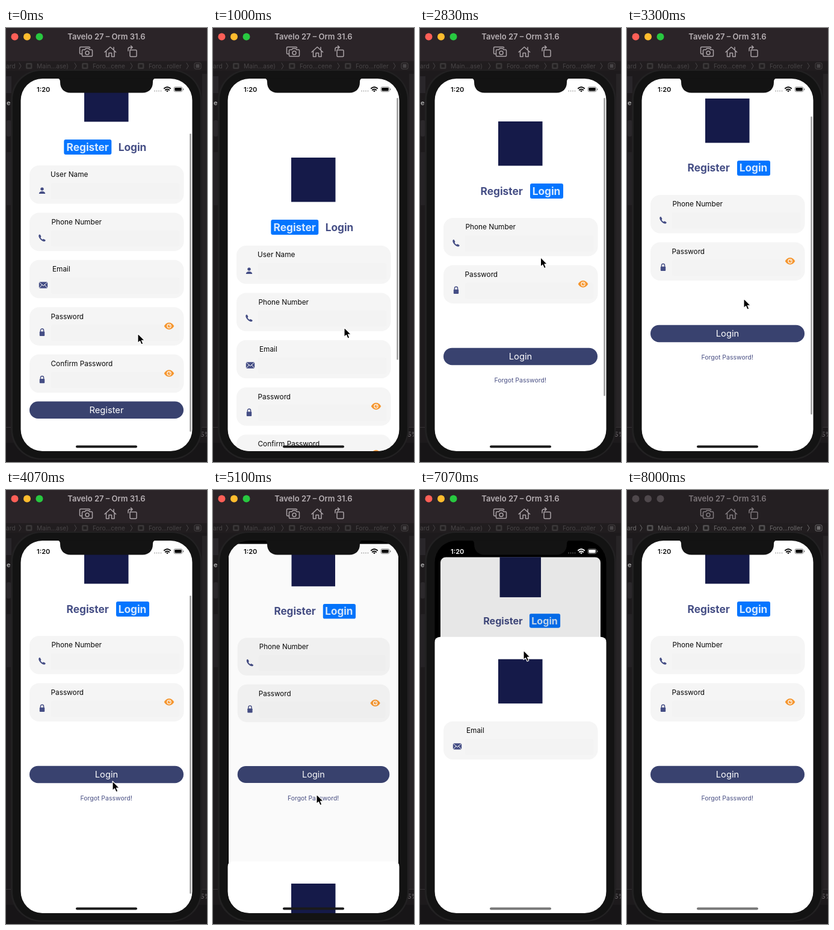
These frames come from a looping animation (334 by 720 pixels, 9.5 s). An HTML page:

```html
<!DOCTYPE html>
<html lang="en">
<head>
<meta charset="utf-8">
<title>Sign-in screens</title>
<style>
  html, body { margin: 0; width: 334px; height: 720px; overflow: hidden; background: #1c191b; }
  svg { display: block; font-family: Inter, "Open Sans", sans-serif; }
  .tab { font-size: 17.3px; font-weight: 700; }
  .label { font-size: 11.8px; fill: #080808; }
  .action { font-size: 14.7px; fill: #fff; text-anchor: middle; }
  .line { fill: none; stroke-linecap: round; stroke-linejoin: round; }
</style>
</head>
<body>
<svg id="stage" width="334" height="720" viewBox="0 0 334 720"></svg>
<script>
const LOOP = 9500, NAVY = '#39426f', INK = '#454e85', BLUE = '#0475ff';

const rect = (x, y, w, h, r, fill, extra = '') =>
  `<rect x="${x}" y="${y}" width="${w}" height="${h}" rx="${r}" fill="${fill}" ${extra}/>`;
const text = (x, y, s, extra = '') => `<text x="${x}" y="${y}" ${extra}>${s}</text>`;

// Icons are drawn around their own centre.
const icons = {
  person: `<circle cy="-2.6" r="2.7"/><path d="M-5.2 5.3C-5.2-.2 5.2-.2 5.2 5.3Z"/>`,
  phone: `<path d="M-5.5-4.6C-4.7-5.8-3.6-6-3.1-5L-1.7-2.5C-1.3-1.7-2.6-1-2.4-.4C-1.8 1-.8 2 .6 2.6C1.2 2.8 1.7 1.4 2.6 1.9L5.2 3.4C6.2 4 5.5 5.4 4.3 5.9C.3 7.2-7.2-.5-5.5-4.6Z"/>`,
  mail: `<rect x="-7.2" y="-5.2" width="14.4" height="10.4" rx="1.8"/>
    <path class="line" stroke="#f5f5f5" d="M-6.5-4.5L0 1.3L6.5-4.5M-6.5 4.5L-2-.5M6.5 4.5L2-.5"/>`,
  lock: `<rect x="-4.2" y="-1.3" width="8.4" height="7.3" rx="1"/>
    <path class="line" stroke="${INK}" stroke-width="1.4" d="M-2.6-1V-3.3C-2.6-6.7 2.6-6.7 2.6-3.3V-1"/>`
};
const eye = y => `<g transform="translate(271 ${y})" fill="#f5962f">
  <path d="M-8.3 0C-4.2-7.6 4.2-7.6 8.3 0C4.2 7.6-4.2 7.6-8.3 0Z"/>
  <circle r="3.7" fill="#fff"/><circle r="2.5"/><circle cx=".6" cy="-.6" r=".9" fill="#fff"/></g>`;

const field = (y, name, icon, labelX, iconX = 60) =>
  rect(39, y, 256.5, 63.5, 16, '#f5f5f5') +
  rect(75, y + 29, 213, 27, 3, '#f3f3f3') +
  text(labelX, y + 19.3, name, 'class="label"') +
  `<g transform="translate(${iconX} ${y + 41.7})" fill="${INK}">${icons[icon]}</g>` +
  (icon === 'lock' ? eye(y + 31.3) : '');
const button = (y, name) =>
  rect(39, y, 256, 28.5, 14.2, NAVY) + text(167, y + 19.6, name, 'class="action"');
const logo = y => rect(130, y, 73.5, 73.5, 0, '#151a49');

const registerForm = [
  ['User Name', 'person', 74], ['Phone Number', 'phone', 75.5], ['Email', 'mail', 77, 62],
  ['Password', 'lock', 74.5], ['Confirm Password', 'lock', 74.5]
].map((f, i) => field(301 + i * 78.4, ...f)).join('') + button(692.5, 'Register');

const loginForm = field(315, 'Phone Number', 'phone', 75.5) + field(393.4, 'Password', 'lock', 74.5) +
  button(530.7, 'Login') +
  text(166.7, 588.3, 'Forgot Password!', `id="forgot" font-size="10.5" fill="#4a5084" text-anchor="middle"`);

const crumb = (x, name) => rect(x, 58, 10.5, 10, 2, '#777') + rect(x + 2.5, 60.5, 5.5, 5, 1, '#222') +
  text(x + 18, 67, name) + `<path class="line" stroke="#aaa" d="M${x + 81} 58l3 5l-3 5"/>`;

const desktop = `
  ${rect(0, 0, 334, 720, 0, '#1d1a1c')}
  ${rect(0, 55, 334, 16, 0, '#211d1f')}
  <g id="crumbs" font-size="10.2" fill="#aaa">${text(0, 67, 'ard')}
    <path class="line" stroke="#aaa" d="M22 58l3 5l-3 5"/>
    ${crumb(33, 'Main...ase)')}${crumb(126, 'Foro...cene')}${crumb(219, 'Foro...roller')}
    ${rect(313, 58, 11, 10, 2, 'none', 'stroke="#aaa"')}${rect(315.5, 60, 6, 6, 0, '#aaa')}</g>
  ${rect(0, 80, 9, 28, 0, '#29262a')}${rect(1, 153, 7, 27, 2, '#2b282b')}
  ${rect(1, 206, 7, 88, 0, '#252225')}${rect(326, 76, 8, 586, 0, '#272426')}
  ${rect(0, 662, 334, 1, 0, '#363235')}${rect(0, 688, 334, 32, 0, '#171517')}
  ${text(1, 128, 'e', 'font-size="11" font-weight="600" fill="#aaa"')}
  ${text(323, 678, '5%', 'font-size="11" fill="#6d696c"')}
  ${rect(0, 0, 334, 55, 0, '#2b2428', 'id="titleBar"')}
  ${[14.5, 35, 55.5].map(x => `<circle class="light" cx="${x}" cy="14.5" r="6"/>`).join('')}
  ${text(167, 18.5, 'Tavelo 27 – Orm 31.6', 'id="title" font-size="13" font-weight="600" text-anchor="middle"')}
  <g id="tools" class="line" stroke-width="1.5">
    <path d="M126 43h-2a1.5 1.5 0 0 1-1.5-1.5v-8.5a1.5 1.5 0 0 1 1.5-1.5h14a1.5 1.5 0 0 1 1.5 1.5"/>
    <path d="M128 36h3l1.5-2h5l1.5 2h3a1.5 1.5 0 0 1 1.5 1.5v8a1.5 1.5 0 0 1-1.5 1.5h-14a1.5 1.5 0 0 1-1.5-1.5v-8a1.5 1.5 0 0 1 1.5-1.5Z"/>
    <circle cx="135" cy="41.3" r="3"/>
    <path d="M164 40l9.3-8.5l9.3 8.5M166.5 38v9.5h4.5v-6h4.5v6h4.5v-9.5M179 36v-4"/>
    <path d="M206 36.5h9.5a1.5 1.5 0 0 1 1.5 1.5v8a1.5 1.5 0 0 1-1.5 1.5h-8a1.5 1.5 0 0 1-1.5-1.5ZM203 38v-3a3 3 0 0 1 3-3h4M207.5 29.5l2.7 2.5l-2.7 2.5"/>
  </g>`;

const phoneView = `
  ${rect(8, 69, 317.5, 647, 50, '#222122')}${rect(11, 71, 312, 643, 48, '#131313')}
  <clipPath id="screen">${rect(24.5, 84, 285, 618, 36, '#000')}</clipPath>
  <clipPath id="page">${rect(24, 84, 286, 619, 10, '#000')}</clipPath>
  <g clip-path="url(#screen)">
    ${rect(24, 84, 286, 619, 0, '#000')}
    <g id="main"><g clip-path="url(#page)">
      ${rect(24, 84, 286, 619, 0, '#fff')}
      <g id="scroll">${logo(155)}
        ${rect(96.3, 258, 79, 25, 3, BLUE, 'id="registerTab"')}
        ${rect(183, 258, 55, 25, 3, BLUE, 'id="loginTab"')}
        ${text(135.7, 276.5, 'Register', 'id="registerText" class="tab" text-anchor="middle"')}
        ${text(210, 276.5, 'Login', 'id="loginText" class="tab" text-anchor="middle"')}
        <g id="registerForm">${registerForm}</g><g id="loginForm">${loginForm}</g>
      </g>
      ${rect(305.4, 116, 2.1, 494.5, 1, '#8c8c8c', 'id="bar"')}
      ${rect(24, 84, 286, 619, 0, '#000', 'id="shade"')}
    </g></g>
    <g id="sheet">
      ${rect(24, 125, 286, 600, 9, '#fff')}${logo(162)}
      ${field(265, 'Email', 'mail', 77, 62)}
      ${rect(106, 614.5, 122, 33.5, 7, NAVY)}
      ${text(166.5, 636.5, 'Reset Password', 'class="action" style="font-size:13.9px"')}
    </g>
    ${rect(116, 692.5, 102, 4, 2, '#111', 'id="home"')}
  </g>
  <path fill="#131313" d="M84 83.5C89 83.5 90 86 90 90C90 101 97 107.5 107 107.5H227C237 107.5 244 101 244 90C244 86 245 83.5 250 83.5Z"/>
  <g id="status">
    ${text(51, 106, '1:20', 'font-size="11" font-weight="600"')}
    ${[247, 250.5, 254, 257.5].map(x => `<circle cx="${x}" cy="104.5" r=".9" opacity=".35"/>`).join('')}
    <path class="line" stroke="currentColor" stroke-width="1.9" stroke-linecap="butt" d="M262.8 100.2q5.2-4.6 10.4 0M264.8 102.8q3.2-2.8 6.4 0"/>
    <path d="M266 104.3q2-1.5 4 0l-2 2Z"/>
    ${rect(279, 97.7, 14, 8, 2.4, 'none', 'stroke="currentColor" stroke-opacity=".45"')}
    ${rect(280.3, 99, 11.4, 5.4, 1.3, 'currentColor')}
    ${rect(294, 100.2, 1.4, 3, .7, 'currentColor', 'opacity=".5"')}
  </g>`;

const pointer = `<path id="cursor" fill="#000" stroke="#fff" stroke-width="1.1" stroke-linejoin="round"
  d="M0 0V15.4L3.5 12.3L6 18L8.8 16.8L6.4 11.2H11.1Z"/>`;

stage.innerHTML = desktop + phoneView + pointer;

const $ = id => document.getElementById(id);
const set = (id, name, value) => $(id).setAttribute(name, value);

// Eased value on a track of [time, value] stops.
function track(t, stops) {
  const i = stops.findIndex(s => s[0] > t);
  if (i === 0) return stops[0][1];
  if (i < 0) return stops[stops.length - 1][1];
  const [t0, a] = stops[i - 1], [t1, b] = stops[i];
  const u = (t - t0) / (t1 - t0);
  return a + (b - a) * u * u * (3 - 2 * u);
}

const scrollStops = [[50, 73], [600, 0], [740, 0], [1000, -60], [1190, -60], [1600, 0],
  [3110, 0], [3300, 38], [3560, 73]];
const sheetStops = [[4950, 0], [5560, 1], [6880, 1], [7230, .64], [7370, .6], [7700, 0]];
const path = [[0, 219, 507], [600, 219, 507], [1000, 218, 497], [1450, 218, 497], [1830, 211, 269],
  [2500, 211, 269], [3070, 194, 449], [3320, 194, 449], [4050, 177, 483], [4130, 177, 483],
  [4370, 172, 505], [5300, 172, 505], [6000, 181, 389], [6300, 181, 389], [6730, 172, 148],
  [6880, 172, 148], [7230, 172, 356], [7370, 172, 379]];
const pathX = path.map(p => [p[0], p[1]]), pathY = path.map(p => [p[0], p[2]]);

function draw(t) {
  const login = t >= 2130, inactive = t >= 7900;
  const y = track(t, scrollStops), p = track(t, sheetStops);

  set('scroll', 'transform', `translate(0 ${-y})`);
  set('bar', 'y', 116 + Math.max(0, y) * .81);
  set('bar', 'height', 494.5 + Math.min(0, y));
  set('bar', 'opacity', track(t, [[4200, 1], [4550, 0]]));

  set('registerTab', 'opacity', track(t, [[2130, 1], [2340, 0]]));
  set('loginTab', 'opacity', +login);
  set('registerText', 'fill', login ? INK : '#d8e9ff');
  set('loginText', 'fill', login ? '#d8e9ff' : INK);
  set('registerForm', 'opacity', +!login);
  set('loginForm', 'opacity', track(t, [[2310, 0], [2600, 1]]));
  set('forgot', 'opacity', t > 4500 && t < 4620 ? .3 : 1);

  set('main', 'transform', `translate(167 ${84 + 34.4 * p}) scale(${1 - .087 * p}) translate(-167 -84)`);
  set('shade', 'opacity', .12 * p);
  set('sheet', 'transform', `translate(0 ${(1 - p) * 580})`);
  const ink = p > .5 ? '#fff' : '#0a0a0a';
  set('status', 'fill', ink);
  set('status', 'color', ink);
  set('home', 'fill', t > 5300 ? '#777' : '#1a1a1a');

  set('titleBar', 'fill', inactive ? '#241f22' : '#2b2428');
  set('title', 'fill', inactive ? '#7d767a' : '#b7b0b4');
  set('tools', 'stroke', inactive ? '#827c80' : '#aaa3a7');
  set('crumbs', 'opacity', inactive ? .55 : .28);
  document.querySelectorAll('.light').forEach((dot, i) =>
    dot.setAttribute('fill', inactive ? '#4f484c' : ['#fe5f57', '#febc2e', '#28c840'][i]));

  set('cursor', 'transform', `translate(${track(t, pathX)} ${track(t, pathY)})`);
  set('cursor', 'opacity', +!inactive);
}

const start = performance.now();
function tick() {
  draw((performance.now() - start) % LOOP);
  requestAnimationFrame(tick);
}
tick();
</script>
</body>
</html>
```
